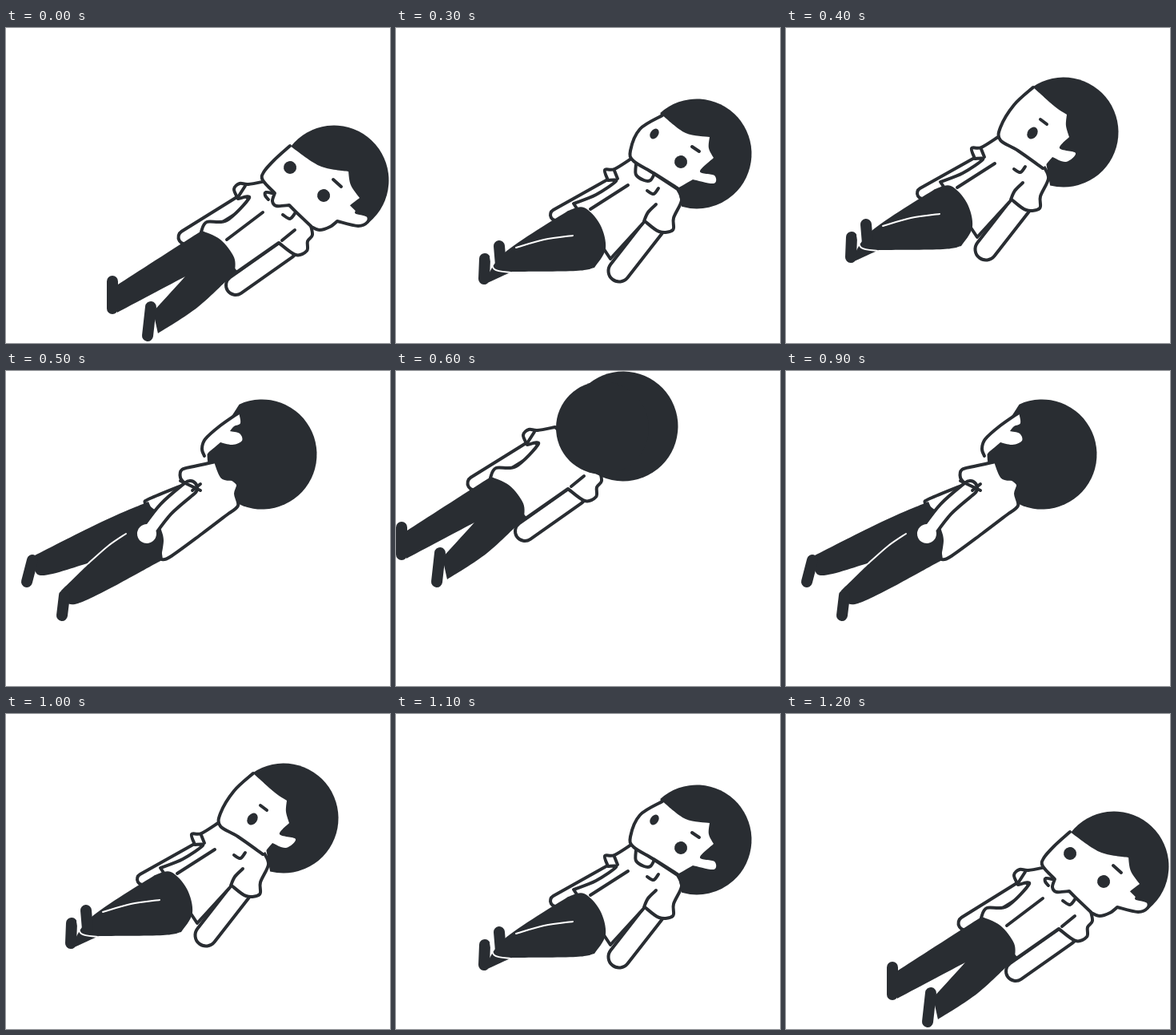
An HTML page with a canvas for the animation above (1500 ms loop, 480x393 px).

```html
<!DOCTYPE html>
<html lang="en">
<head>
<meta charset="utf-8">
<title>Rolling over</title>
<style>
html, body { margin: 0; width: 100%; height: 100%; overflow: hidden; background: #fff; }
canvas { display: block; width: 480px; height: 393px; }
</style>
</head>
<body>
<canvas id="stage" width="480" height="393"></canvas>
<script>
const ctx = document.getElementById('stage').getContext('2d');
const INK = '#292d32', PAPER = '#fff';

// Smooth curve through "x,y" points; "/" makes the point before it a corner.
function curve(text) {
  const path = new Path2D();
  let last = null;
  for (const part of text.split('/')) {
    const p = part.trim().split(/\s+/).map(s => s.split(',').map(Number));
    if (last) p.unshift(last);
    else path.moveTo(...p[0]);
    for (let i = 0; i < p.length - 1; i++) {
      const a = p[i - 1] || p[i], b = p[i], c = p[i + 1], d = p[i + 2] || c;
      path.bezierCurveTo(
        b[0] + (c[0] - a[0]) / 6, b[1] + (c[1] - a[1]) / 6,
        c[0] - (d[0] - b[0]) / 6, c[1] - (d[1] - b[1]) / 6, c[0], c[1]);
    }
    last = p[p.length - 1];
  }
  return path;
}

function fill(text, color = INK) {
  ctx.fillStyle = color;
  ctx.fill(curve(text));
}

function line(text, width = 4, color = INK) {
  ctx.strokeStyle = color;
  ctx.lineWidth = width;
  ctx.stroke(curve(text));
}

function dot(x, y, rx, ry = rx, color = INK) {
  ctx.fillStyle = color;
  ctx.beginPath();
  ctx.ellipse(x, y, rx, ry, 0.6, 0, 7);
  ctx.fill();
}

// Outlined round-ended arm of the given overall width
function arm(text, width) {
  line(text, width);
  line(text, width - 8, PAPER);
}

function shirt(text) {
  const path = curve(text);
  path.closePath();
  ctx.fillStyle = PAPER;
  ctx.fill(path);
  ctx.strokeStyle = INK;
  ctx.lineWidth = 4;
  ctx.stroke(path);
}

function trousers(legs, ...feet) {
  fill(legs);
  for (const foot of feet) line(foot, 14);
}

function seam(text) {
  line(text, 2, PAPER);
}

// Round hair between two angles, with the face cut into it
function head(x, y, from, to, hairline, jaw) {
  ctx.fillStyle = INK;
  ctx.beginPath();
  ctx.arc(x, y, 68.5, from, to);
  ctx.fill();
  fill(hairline + ' / ' + jaw, PAPER);
  line(jaw);
}

function at(dx, dy, paint) {
  ctx.save();
  ctx.translate(dx, dy);
  paint();
  ctx.restore();
}

function flatBody() {
  arm('295,217 224,261', 21);
  arm('351,276 287,321', 28);
  shirt('325,191 303,195 292,194 285,201 290,213 / 304,212 276,240 251,242 244,254 / 288,305 / 341,268 / 362,283 376,278 377,266 383,258 380,243');
  line('299,197 290,211');
  line('361,252 345,265');
  trousers('245,253 268,264 285,286 286,305 / 240,348 190,381 / 184,354 / 224,310 / 139,355 / 140,320 / 235,259 245,253',
    '133,316 133,350', '181,348 177,384');
}

function turnedBody() {
  arm('268,195 200,233', 18);
  arm('322,248 279,303', 31);
  shirt('294,163 273,176 261,177 265,190 / 275,191 250,208 222,219 / 268,288 / 311,241 / 329,254 346,252 347,237 357,215 352,201');
  line('273,178 277,188');
  line('290,196 243,226');
  line('314,203 322,207 328,200');
  line('325,220 315,230 310,241');
  trousers('215,228 235,224 255,245 262,275 248,299 / 225,303 145,304 / 110,320 / 135,281 215,228',
    '111,288 110,313', '129,272 131,296');
  seam('118,286 123,301 143,305');
  seam('150,274 185,264 221,259');
}

function front() {
  flatBody();
  line('321,230 276,264');
  line('333,206 325,205 324,209 328,214');
  line('346,233 355,238 362,230');
  head(410, 190, -2.48, 0.9,
    '355,147 392,172 428,179 / 431,196 442,212 / 428,224 438,230',
    '438,230 452,234 452,242 440,247 414,241 / 405,248 392,252 382,248 / 363,230 354,221 / 338,222 333,216 336,206 / 321,190 322,180 335,165 355,147');
  dot(355, 174, 8);
  dot(397, 209, 8);
  line('409,189 419,198');
}

function turned() {
  turnedBody();
  head(376, 157, -2.3, 1.85,
    '333,109 362,131 392,136 / 391,150 397,162 / 380,179 398,184 397,194 371,189 / 352,200',
    '352,200 322,181 297,166 293,153 305,126 333,109');
  line('300,170 300,183 310,190 318,190 323,182');
  dot(323, 132, 5, 7);
  dot(356, 167, 8);
  line('370,148 379,154');
}

function side() {
  at(-29, -27, turnedBody);
  head(347, 130, -2.17, 1.82,
    '309,74 336,98 351,108 / 350,122 354,136 / 342,150 362,156 350,167 333,161 / 321,175',
    '321,175 290,153 268,140 268,124 285,96 309,74');
  dot(308, 131, 6, 8);
  line('318,114 326,120');
}

function away() {
  head(320, 104, -2, Math.PI,
    '248,106 268,89 / 283,92 295,87 292,78 280,75 / 285,69 293,65 291,52',
    '291,52 268,68 249,85 245,97 248,106');
  shirt('262,113 235,119 220,123 218,133 224,141 / 180,159 174,165 185,175 / 194,235 / 205,232 245,203 278,178 / 290,168 287,153 290,142 283,135 / 270,132 262,113');
  trousers('178,163 120,188 36,230 / 43,255 105,239 / 69,274 / 90,290 193,237 / 197,212 194,198 / 178,163',
    '33,236 26,263', '73,280 70,305');
  seam('103,240 128,218 150,203');
  arm('230,146 200,172 176,203', 22);
  dot(176, 203, 12, 12, PAPER);
  line('218,137 243,149');
  line('233,149 243,141');
}

function back() {
  flatBody();
  dot(410, 190, 68.5);
  dot(384, 192, 58);
}

// Rolls from front to back and returns; one pose per 100 ms slot
const poses = [front, turned, side, away, () => at(-126, -121, back)];
const order = '000123444321000';

function draw() {
  const slot = Math.floor(performance.now() % 1500 / 100);
  ctx.fillStyle = PAPER;
  ctx.fillRect(0, 0, 480, 393);
  ctx.lineCap = ctx.lineJoin = 'round';
  poses[order[slot]]();
  requestAnimationFrame(draw);
}
draw();
</script>
</body>
</html>
```
